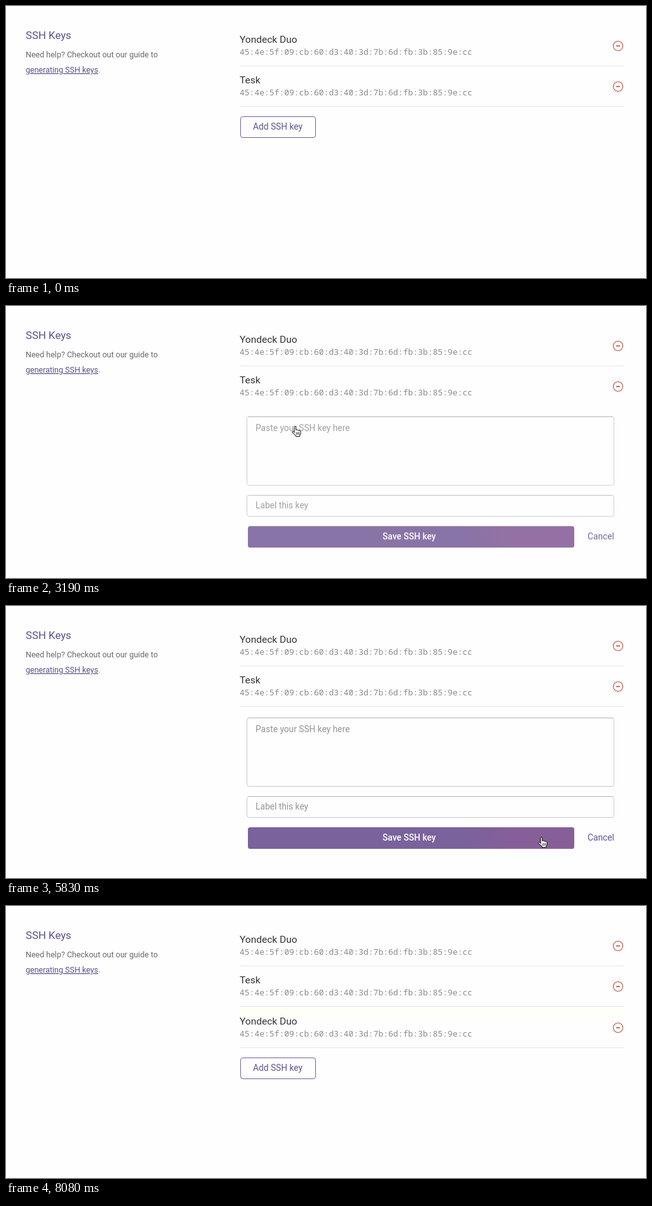
An HTML page for the animation above (9.83 s loop, 1008 by 429 pixels).

```html
<!DOCTYPE html>
<html lang="en">
<head>
<meta charset="utf-8">
<title>SSH Keys</title>
<style>
  html, body { margin: 0; width: 100%; height: 100%; overflow: hidden; background: #fefefe; }
  svg { display: block; font: 13.75px Roboto, "Open Sans", sans-serif; }
  text { white-space: pre; }
  .title { font-size: 16.8px; fill: #5e5089; }
  .help { font-size: 12.5px; fill: #676a6e; }
  .link { fill: #5e5089; text-decoration: underline; text-decoration-skip-ink: none; }
  .name { font-size: 15.5px; fill: #303235; }
  .print { font: 13px "Noto Sans Mono", "Liberation Mono", monospace; fill: #8a8a8a; }
  .rule { fill: #e6e6e6; }
  .minus { fill: none; stroke: #b5523f; stroke-width: 1.1; }
  .minus line { stroke-width: 1.6; }
  .outline { fill: #fefefe; stroke: #75609a; }
  .field { fill: #fefefe; stroke: #c9c9c9; }
  .shade { stroke: #b4b4b4; }
  .hint { fill: #949494; }
  .action { fill: #62528f; }
  .save { fill: #fff; font-weight: 500; text-anchor: middle; }
</style>
</head>
<body>
<svg width="1008" height="429" viewBox="0 0 1008 429">
  <defs>
    <linearGradient id="purple">
      <stop offset=".66" stop-color="#7a629c"/>
      <stop offset=".8" stop-color="#865f98"/>
    </linearGradient>
    <g id="row">
      <text class="print" x="368" y="77">45:4e:5f:09:cb:60:d3:40:3d:7b:6d:fb:3b:85:9e:cc</text>
      <g class="minus"><circle cx="964" cy="63" r="7.5"/><line x1="961" x2="967" y1="63" y2="63"/></g>
    </g>
  </defs>

  <text class="title" x="31" y="52">SSH Keys</text>
  <text class="help" x="31" y="81">Need help? Checkout out our guide to</text>
  <text class="help" x="31" y="105"><tspan class="link">generating SSH keys</tspan>.</text>

  <use href="#row"/>
  <text class="name" x="368" y="58">Yondeck Duo</text>
  <rect class="rule" x="368" y="94" width="606" height="1"/>
  <use href="#row" y="64"/>
  <text class="name" x="368" y="122">Tesk</text>
  <rect id="rule" class="rule" x="368" y="158" width="606" height="1"/>

  <g id="add">
    <rect class="outline" x="369.5" y="174.5" width="118" height="33" rx="3.5"/>
    <text class="action" x="389" y="195">Add SSH key</text>
  </g>

  <g id="form">
    <rect class="field" x="379.5" y="176.5" width="578" height="108" rx="3"/>
    <path class="shade" d="M382 176.5H955"/>
    <text class="hint" x="393" y="199">Paste your SSH key here</text>
    <rect class="field" x="379.5" y="300.5" width="578" height="33" rx="3"/>
    <path class="shade" d="M382 300.5H955"/>
    <text class="hint" x="393" y="321">Label this key</text>
    <rect x="381" y="349" width="514" height="34" rx="3.5" fill="url(#purple)"/>
    <text class="save" x="635" y="370">Save SSH key</text>
    <text class="action" x="916" y="370">Cancel</text>
  </g>

  <rect id="strip" x="368" y="159" width="605" height="18" fill="#fefff6"/>
  <rect id="glow" x="368" y="159" width="605" height="66" fill="#ffffb0"/>
  <g id="fresh">
    <use href="#row" y="129"/>
    <text class="name" x="368" y="187">Yondeck Duo</text>
    <rect class="rule" x="368" y="223" width="606" height="1"/>
  </g>

  <g id="cursor">
    <path id="arrow" d="M.5 .8V15l3.2-3 2.2 4.9 2.5-1.1-2.1-4.8h4.5z" fill="#000" stroke="#fff"/>
    <g id="hand" stroke="#000" stroke-linejoin="round" stroke-linecap="round">
      <path d="M-1 9.5V2.1a1.35 1.35 0 0 1 2.7 0V6.4q2-.9 2.8.5q1.9-.5 2.5.7q2-.2 2.1 1.3V12l-1.4 3.2v1.6H1.4v-1.5L-4 10.7q-1-1.7.7-2.1 1.2 0 2.3 1.7z" fill="#fff"/>
      <path d="M2.3 10.5v3.2M4.4 10.5v3.2M6.5 10.5v3.2" fill="none" stroke-width=".8"/>
    </g>
  </g>
</svg>
<script>
const LOOP = 9830;
const QUART = 'cubic-bezier(.165, .84, .44, 1)';
const STEP = 'step-end';
const start = document.timeline.currentTime || 0;

// steps: [ms, properties, easing towards the next step]
function play(id, steps) {
  const last = steps[steps.length - 1];
  const frames = [...steps, [LOOP, last[1]]].map(([ms, props, easing = 'linear']) =>
    ({ offset: ms / LOOP, easing, ...props }));
  const anim = document.getElementById(id).animate(frames, { duration: LOOP, iterations: Infinity });
  anim.startTime = start;
}

const at = (x, y, opacity) => {
  const transform = `translate(${x}px, ${y}px)`;
  return opacity === undefined ? { transform } : { transform, opacity };
};
const fade = (id, steps) => play(id, steps.map(([ms, opacity, ease]) => [ms, { opacity }, ease]));

fade('rule', [[0, 1, STEP], [3110, 0, STEP], [3310, 1]]);

play('add', [
  [0, at(0, 0, 1), STEP],
  [3110, at(0, 0, 0), STEP],
  [6400, at(0, 65, 0)],
  [6560, at(0, 65, 1)]
]);

play('form', [
  [0, at(0, -16, 0), STEP],
  [3095, at(0, -16, 0), QUART],
  [3310, at(0, 0, 1), STEP],
  [6260, at(0, 0, 1), 'ease-in'],
  [6440, at(0, -16, 0)]
]);

fade('glow', [[0, 0, STEP], [6230, .48, STEP], [6420, .48], [7180, 0]]);
fade('strip', [[0, 0, STEP], [7100, 1]]);
fade('fresh', [[0, 0, STEP], [6260, 0], [6440, 1]]);

// [ms, x, y, easing] of the pointer's hot spot
const path = [
  [0, 481, 440, STEP], [900, 481, 424, STEP], [990, 481, 440, STEP],
  [1230, 481, 424, STEP], [1270, 490, 419, STEP], [1310, 502, 440, STEP],
  [1460, 503, 424], [1550, 501, 365], [1640, 488, 285, 'ease-out'], [1730, 478, 250, STEP],
  [2120, 478, 250, 'ease-in'], [2280, 474, 202], [2390, 472, 183, 'ease-out'], [2580, 455, 189, STEP],
  [3640, 455, 189, 'ease-in'], [3860, 516, 192], [4050, 580, 232, 'ease-out'], [4250, 624, 283, STEP],
  [4730, 624, 283, 'ease-in-out'], [5050, 620, 362, STEP],
  [5620, 620, 362, 'ease-in-out'], [5850, 846, 364, 'ease-in-out'], [6020, 786, 364, STEP],
  [7270, 786, 364, 'ease-in'], [7600, 820, 390], [8080, 872, 440, STEP]
];
play('cursor', path.map(([ms, x, y, ease]) => [ms, at(x, y), ease]));

const swaps = [0, 2290, 3640, 4980, 7270];
fade('arrow', swaps.map((ms, i) => [ms, 1 - i % 2, STEP]));
fade('hand', swaps.map((ms, i) => [ms, i % 2, STEP]));
</script>
</body>
</html>
```
